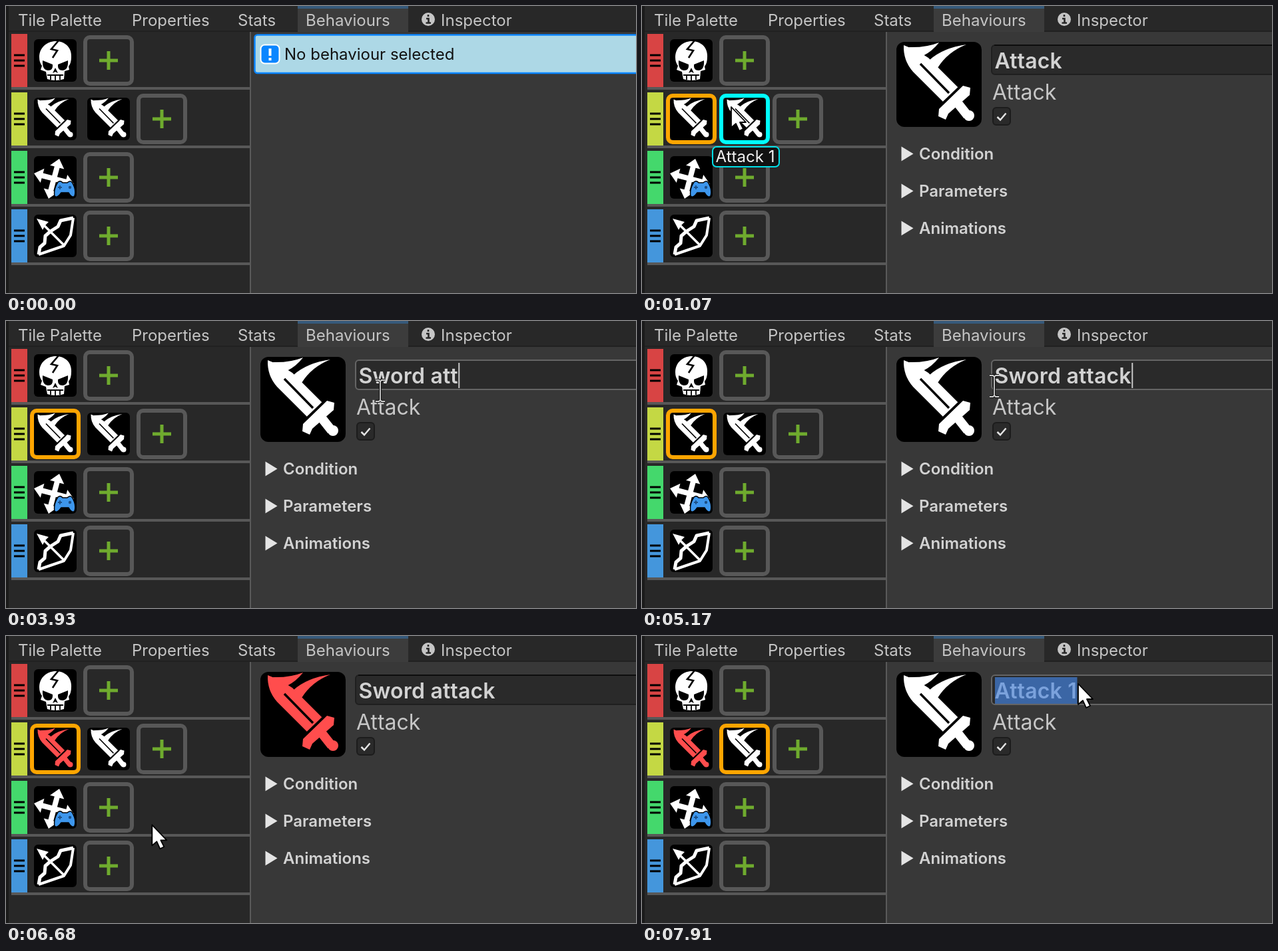
An HTML page for the animation above (8 s loop, 946 px wide and 432 px high).

```html
<!DOCTYPE html>
<html lang="en">
<head>
<meta charset="utf-8">
<title>Behaviours panel</title>
<style>
  html, body { margin: 0; width: 100%; height: 100%; overflow: hidden; background: #282828; }
  svg { display: block; width: 946px; height: 432px; }
  text { font-family: Inter, Roboto, sans-serif; font-size: 24px; font-optical-sizing: none; fill: #c6c6c6; white-space: pre; }
  .bold { font-weight: 600; fill: #d2d2d2; }
  .big { font-size: 32px; }
  #title { letter-spacing: .2px; }
</style>
</head>
<body>
<svg viewBox="0 0 946 432" xmlns="http://www.w3.org/2000/svg">
  <defs>
    <symbol id="sword" viewBox="0 0 128 128">
      <g fill="currentColor">
        <path d="M11 5Q30 12 48 24L93 69L71 91L25 45Q10 28 11 5Z"/>
        <path d="M18 8Q44 9 64 1Q54 14 40 21Z"/>
        <path d="M50 27Q70 9 105 4Q77 15 62 39Z"/>
        <path d="M100 66L111 69L110 80L78 108L74 117L63 112L64 101Z"/>
      </g>
      <path d="M92 92L107 111" stroke="currentColor" stroke-width="14"/>
      <circle cx="109" cy="111" r="8" fill="currentColor"/>
      <path d="M36 33L79 77M69 93L95 68" stroke="#000" stroke-width="3.500" fill="none"/>
    </symbol>
    <symbol id="skull" viewBox="0 0 64 64">
      <path fill="#fff" d="M33 3C47 3 57 13 56 27Q56 36 52 41L53 46L46 48L45 60Q32 64 20 60L18 49L10 46L12 40Q8 35 8 27C8 13 19 3 33 3Z"/>
      <path d="M37 2L26 15L35 17L28 28" fill="none" stroke="#000" stroke-width="2.600"/>
      <path d="M13 32L28 38Q29 47 21 47Q12 46 13 32ZM51 32L36 38Q35 47 43 47Q52 46 51 32ZM32 43L28 51L32 49L36 51Z"/>
      <path d="M20 54H44M25 53V61M32 54V62M39 53V61" stroke="#000" stroke-width="1.800"/>
    </symbol>
    <symbol id="move" viewBox="0 0 64 64">
      <g id="arms" fill="#fff" transform="translate(30 34) rotate(15)"></g>
      <path fill="#3d96ec" stroke="#000" stroke-width="1.500" d="M36 39Q40 36 43 40H50Q54 36 57 39Q64 50 61 60Q57 64 52 55H41Q35 64 31 60Q29 50 36 39Z"/>
      <path d="M36 47H42M39 44V50" stroke="#1d4f86" stroke-width="1.800"/>
      <circle cx="54" cy="47" r="2.200" fill="#1d4f86"/>
    </symbol>
    <symbol id="bow" viewBox="0 0 64 64">
      <g fill="none" stroke="#fff" stroke-linejoin="round">
        <path stroke-width="5" d="M59 5L40 9L36 18L25 25L17 32L16 43L9 49L7 60"/>
        <path stroke-width="4" d="M59 5L55 31L45 47L7 60"/>
        <path stroke-width="3.500" d="M12 13L45 46"/>
      </g>
      <path fill="#fff" d="M4 6L22 11L17 16L13 23Z"/>
    </symbol>
  </defs>

  <rect width="946" height="432" fill="#282828"/>
  <rect y="37" width="946" height="2" fill="#212121"/>
  <rect x="368" y="39" width="578" height="393" fill="#383838"/>
  <rect x="438" width="166" height="39" fill="#3c3c3c"/>
  <rect x="438" width="166" height="4" fill="#365a7b"/>
  <rect width="4" height="432" fill="#1a1a1a"/>
  <rect x="366" y="39" width="2" height="393" fill="#5a5a5a"/>
  <g id="tabs"></g>
  <circle cx="634" cy="20" r="10" fill="#c6c6c6"/>
  <path d="M634 13V16M631 19H634.500V25M630.500 25.500H638" stroke="#282828" stroke-width="2.600" fill="none"/>
  <g id="rows"></g>

  <g id="empty">
    <rect x="373.500" y="43.500" width="590" height="57.500" rx="4" fill="#add8e6" stroke="#0a86ff" stroke-width="2.500"/>
    <rect x="382.500" y="58.500" width="28" height="28" rx="6" fill="#0a86ff" stroke="#fff" stroke-width="2"/>
    <path d="M396.500 64V75M396.500 78V82" stroke="#fff" stroke-width="4"/>
    <text x="418" y="81" style="fill:#111">No behaviour selected</text>
  </g>

  <g id="panel">
    <rect x="382" y="54" width="128" height="128" rx="12"/>
    <use id="bigSword" href="#sword" x="382" y="54" width="128" height="128"/>
    <g id="dots"></g>
    <rect id="field" x="525" y="59" width="440" height="44" rx="5" fill="#2a2a2a" stroke-width="2"/>
    <path id="shade" d="M529 59H946" stroke="#0d0d0d" stroke-width="2"/>
    <rect id="selection" x="530" y="62" height="40" fill="#3b66a5"/>
    <text id="title" class="bold big" x="529.500" y="94"></text>
    <rect id="caret" y="63" width="2" height="38" fill="#c6c6c6"/>
    <text class="big" x="526" y="141">Attack</text>
    <rect x="527" y="153" width="26" height="26" rx="5" fill="#2a2a2a" stroke="#1c1c1c" stroke-width="2"/>
    <path d="M533.500 167L538 171.500L546.500 161.500" fill="none" stroke="#e4e4e4" stroke-width="2.500"/>
    <g id="folds"></g>
  </g>

  <g id="tip">
    <rect id="tipBox" y="212" height="30" rx="6" fill="#121212" stroke="#00e0e8" stroke-width="2"/>
    <text id="tipText" y="235" text-anchor="middle" style="fill:#f0f0f0"></text>
  </g>
  <circle id="press" r="23" fill="#ffe600" opacity=".52"/>
  <path id="arrow" d="M0 0V31L7 25L12 36L18 33L13 23H22Z" fill="#fff" stroke="#000" stroke-width="1.800" stroke-linejoin="round"/>
  <g id="beam" fill="none">
    <path d="M-7 -16H-2L0 -14L2 -16H7M0 -14V14M-7 16H-2L0 14L2 16H7" stroke="#111" stroke-width="4"/>
    <path d="M-7 -16H-2L0 -14L2 -16H7M0 -14V14M-7 16H-2L0 14L2 16H7" stroke="#d0d0d0" stroke-width="1.800"/>
  </g>
</svg>
<script>
const LOOP = 8000, RED = '#ff4d4d';
const $ = id => document.getElementById(id);
const show = (id, on) => $(id).style.display = on ? '' : 'none';
const place = (id, x, y) => $(id).setAttribute('transform', `translate(${x} ${y})`);
const frame = (x, y, color, id = '') =>
  `<rect ${id && `id="${id}"`} x="${x + 3}" y="${y + 3}" width="70" height="70" rx="7" fill="none" stroke="${color}" stroke-width="6"/>`;
const icon = (name, x, y, id) =>
  `<rect x="${x}" y="${y}" width="64" height="64" rx="6"/>
   <use id="${id}" href="#${name}" x="${x}" y="${y}" width="64" height="64" color="#fff"/>`;

function row(color, names, i) {
  const y = 42 + 88 * i, px = 116 + 80 * (names.length - 1);
  return `<rect x="8" y="${y}" width="24" height="80" fill="${color}"/>
    <path d="M12 ${y + 32}h16m-16 8h16m-16 8h16" stroke="#000" stroke-width="3"/>
    <rect x="8" y="${y + 80}" width="359" height="4" fill="#585858"/>` +
    names.map((n, k) => icon(n, 42 + 80 * k, y + 8, `icon${i}${k}`)).join('') +
    frame(px, y + 2, '#585858') +
    `<path d="M${px + 24} ${y + 40}h28m-14 -14v28" stroke="#6fab2e" stroke-width="5"/>`;
}

$('arms').innerHTML = [0, 90, 180, 270].map(a =>
  `<path transform="rotate(${a})" d="M-4 0V-18H-11L0 -31L11 -18H4V0Z"/>`).join('');
$('tabs').innerHTML = [['Tile Palette', 18], ['Properties', 189], ['Stats', 348], ['Behaviours', 450], ['Inspector', 653]]
  .map(([s, x]) => `<text x="${x}" y="30">${s}</text>`).join('');
$('rows').innerHTML = [['#d84444', ['skull']], ['#c4d844', ['sword', 'sword']], ['#44d86c', ['move']], ['#4496dc', ['bow']]]
  .map(([c, n], i) => row(c, n, i)).join('') + frame(36, 132, '', 'slot0') + frame(116, 132, '', 'slot1');
$('folds').innerHTML = ['Condition', 'Parameters', 'Animations'].map((s, i) =>
  `<path d="M389.500 ${211.5 + 56 * i}l18 11l-18 11z" fill="#e4e4e4"/>
   <text class="bold" x="416" y="${231 + 56 * i}">${s}</text>`).join('');
$('dots').innerHTML = ['#fff', RED, '#fff23c', '#50f082', '#50b0ff'].map((c, i) =>
  `<circle cx="${394 + 26 * i}" cy="165" r="8" fill="${c}"/>`).join('') +
  `<circle id="ring" cx="420" cy="165" r="11" fill="none" stroke="${RED}" stroke-width="2"/>`;

// Pointer path: time, x, y
const path = [
  [330, 188, 422], [540, 75, 165], [980, 75, 165], [1070, 134, 152], [1190, 562, 105],
  [4800, 562, 105], [4830, 574, 113], [4860, 586, 121], [5030, 586, 121], [5170, 529, 98],
  [5300, 472, 128], [5750, 425, 169], [6380, 425, 169], [6560, 300, 388], [6810, 132, 172],
  [7360, 132, 172], [7390, 152, 172], [7820, 638, 80], [7910, 655, 72]
];
const presses = [[850, 960], [1570, 1700], [6000, 6060], [7010, 7180]];
const typed = 'Sword attack';
const keyTimes = [2470, 2700, 2910, 3040, 3200, 3330, 3640, 3800, 3930, 4090, 4290, 4320];

function pointer(t) {
  const i = path.findLastIndex(p => p[0] <= t);
  if (i < 0) return [-99, -99];
  const [t0, x, y] = path[i];
  if (i === path.length - 1) return [x, y];
  const [t1, x1, y1] = path[i + 1];
  const k = Math.floor((t - t0) / 30) * 30 / (t1 - t0);
  return [x + (x1 - x) * k, y + (y1 - y) * k];
}

function titleAt(t) {
  if (t >= 7010) return 'Attack 1';
  const n = keyTimes.filter(k => k <= t).length;
  return n ? typed.slice(0, n) : 'Attack';
}

function draw(t) {
  const [x, y] = pointer(t);
  const over = (l, top, r, b) => x >= l && x <= r && y >= top && y <= b;
  const between = (a, b) => t >= a && t < b;

  show('empty', t < 850);
  show('panel', t >= 850);

  const picked = t < 850 ? -1 : t < 7010 ? 0 : 1;
  let hovered = -1;
  [0, 1].forEach(i => {
    const hot = over(36 + 80 * i, 132, 112 + 80 * i, 208);
    if (hot) hovered = i;
    show('slot' + i, hot || picked === i);
    $('slot' + i).setAttribute('stroke', hot ? '#00ffff' : '#ffa500');
  });
  show('tip', hovered >= 0);
  if (hovered >= 0) {
    const w = hovered ? 100 : 82, mid = hovered ? 156 : 75;
    $('tipBox').setAttribute('x', mid - w / 2);
    $('tipBox').setAttribute('width', w);
    $('tipText').setAttribute('x', mid - 1);
    $('tipText').textContent = hovered ? 'Attack 1' : 'Attack';
  }

  $('icon10').setAttribute('color', t >= 6000 ? RED : '#fff');
  $('bigSword').setAttribute('color', between(6000, 7010) ? RED : '#fff');
  show('dots', over(382, 54, 510, 182));
  show('ring', Math.hypot(x - 420, y - 165) < 12);

  const selected = between(1570, 2470) || t >= 7910;
  const lit = over(525, 59, 946, 110) || between(1190, 5170);
  $('title').textContent = titleAt(t);
  $('title').style.fill = selected ? '#7ba2dc' : '';
  $('field').setAttribute('stroke', lit ? '#656565' : '#1f1f1f');
  show('shade', !lit);
  const width = t >= 850 ? $('title').getComputedTextLength() : 0;
  show('selection', selected);
  $('selection').setAttribute('width', width);
  show('caret', between(2470, 6000));
  $('caret').setAttribute('x', 530 + width);

  const beam = between(1190, 5230);
  show('beam', beam);
  show('arrow', !beam);
  place('beam', x, y);
  place('arrow', x, y);
  show('press', presses.some(([a, b]) => between(a, b)));
  place('press', x - 2, y - 4);
}

const start = performance.now();
function tick() {
  draw((performance.now() - start) % LOOP);
  requestAnimationFrame(tick);
}
tick();
</script>
</body>
</html>
```
